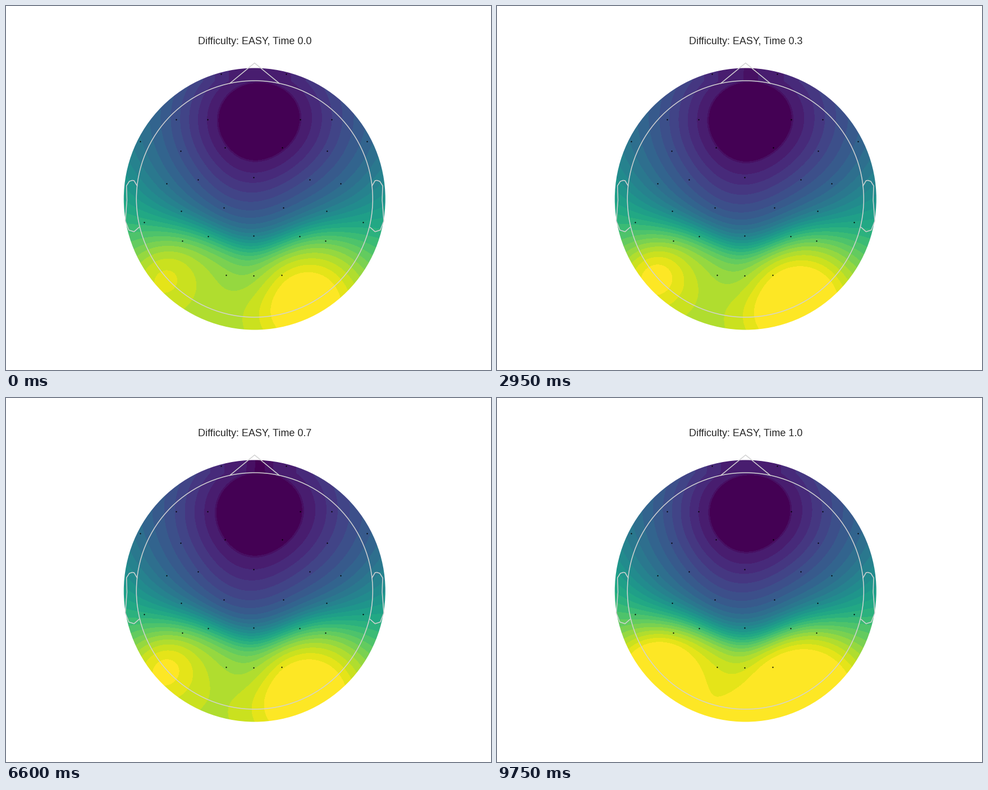
A matplotlib script for the animation above (10 s loop, 864 by 648 pixels).

```python
import matplotlib.pyplot as plt
import numpy as np
from matplotlib.animation import FuncAnimation
from matplotlib.patches import Circle

W, H, DPI = 864, 648, 72
FRAMES, INTERVAL = 200, 50
CX, CY, SCALP_R, HEAD_R = 442.8, 343.5, 233, 210.5
BANDS = 26
LINE = dict(color="lightgrey", lw=1.5, zorder=3)

# Sensors come in pairs (distance from the midline, height), plus three between.
MIDLINE = 441.3
PAIRS = [(58, 120.5), (138.5, 201.5), (82.5, 202), (202, 241), (130.5, 257.5),
         (51, 252), (99.5, 308.5), (155, 316), (129.5, 365), (53, 359),
         (195, 385), (127.5, 417.5), (81.5, 410), (49.5, 478.5)]
SENSORS = ([(MIDLINE + side * d, y) for d, y in PAIRS for side in (-1, 1)]
           + [(MIDLINE, y) for y in (304.5, 408.5, 479.5)])

# Strength of each part of the field at a few key times, in seconds.
KEY_TIMES = (0.25, 2, 2.95, 4.5, 5.55, 7.6, 9.75)
FRONT = (11.3, 10.4, 10.9, 11.6, 10.5, 10.0, 11.5)
BACK = (10.7, 11.6, 11.3, 11.3, 12.3, 12.0, 13.1)
LEFT = (2.3, 3.1, 3.6, 4.1, 3.7, 2.7, 3.9)
RIGHT = (5.5, 6.5, 6.5, 5.8, 5.3, 6.5, 5.0)

X0, X1, Y0, Y1 = 208, 678, 108, 579
p, q = np.meshgrid((np.arange(X0, X1) + 0.5 - CX) / SCALP_R,
                   (np.arange(Y0, Y1) + 0.5 - CY) / SCALP_R)


def bump(x, y, spread):
    return np.exp(-((p - x) ** 2 + (q - y) ** 2) / (2 * spread ** 2))


# A bowl at the forehead, a step towards the back of the head and two peaks.
depth = 1.15 * (np.maximum(q, -0.9) + 0.625)
bowl = 1 - np.exp(-((p - 0.02) ** 2 + depth ** 2) / 0.5)
step_at = 0.365 - 0.16 * (1 - np.exp(-(p / 0.35) ** 2))
step = 1 / (1 + np.exp(-(q - step_at) / (0.075 + 0.2 * p ** 4)))
left_peak = bump(-0.7, 0.565, 0.2)
right_peak = bump(0.4, 0.8, 0.28)
fixed = -0.7 * p - 1.8 * bump(-0.1, 0.02, 0.3) - bump(-0.03, 0.6, 0.15)

bounds = np.arange(1.0, BANDS)
bounds[0] = 1.85  # the lowest band is ringed by a very thin one
palette = (plt.get_cmap("viridis")(np.linspace(0, 1, BANDS)) * 255).round().astype(np.uint8)


def scalp_image(i):
    front, back, left, right = (np.interp(i * INTERVAL / 1000, KEY_TIMES, part)
                                for part in (FRONT, BACK, LEFT, RIGHT))
    field = fixed + front * bowl + back * step + left * left_peak + right * right_peak
    return palette[np.digitize(field, bounds)]


fig = plt.figure(figsize=(W / DPI, H / DPI), dpi=DPI, facecolor="white")
ax = fig.add_axes([0, 0, 1, 1])
ax.axis("off")

image = ax.imshow(scalp_image(0), extent=(X0, X1, Y1, Y0),
                  interpolation="nearest", aspect="auto", zorder=1)
image.set_clip_path(Circle((CX, CY), SCALP_R, transform=ax.transData))
ax.set_xlim(0, W)
ax.set_ylim(H, 0)

ax.plot(*zip(*SENSORS), "o", color="black", ms=2.2, mew=0, zorder=2)

ax.add_patch(Circle((CX, CY), HEAD_R, fill=False, ec=LINE["color"],
                    lw=LINE["lw"], zorder=LINE["zorder"]))
nose_x, nose_y = 0.209, np.sqrt(1 - 0.209 ** 2)
ax.plot(CX + HEAD_R * np.array([-nose_x, 0, nose_x]),
        CY - HEAD_R * np.array([nose_y, 1.15, nose_y]), **LINE)

ear = HEAD_R * np.array([(0.994, 0.111), (1.02, 0.155), (1.036, 0.157), (1.06, 0.149),
                         (1.084, 0.111), (1.08, -0.011), (1.094, -0.186),
                         (1.064, -0.263), (1.02, -0.277), (0.978, -0.24)])
for side in (-1, 1):
    ax.plot(CX + side * ear[:, 0], CY - ear[:, 1], **LINE)

title = ax.text(CX, 68, "", ha="center", va="baseline", fontsize=18,
                family="Liberation Sans", color="0.15")


def update(i):
    image.set_data(scalp_image(i))
    title.set_text(f"Difficulty: EASY, Time {i / (FRAMES - 1):.1f}")
    return image, title


anim = FuncAnimation(fig, update, frames=FRAMES, interval=INTERVAL,
                     repeat=True, repeat_delay=0, blit=False)
plt.show()
```
